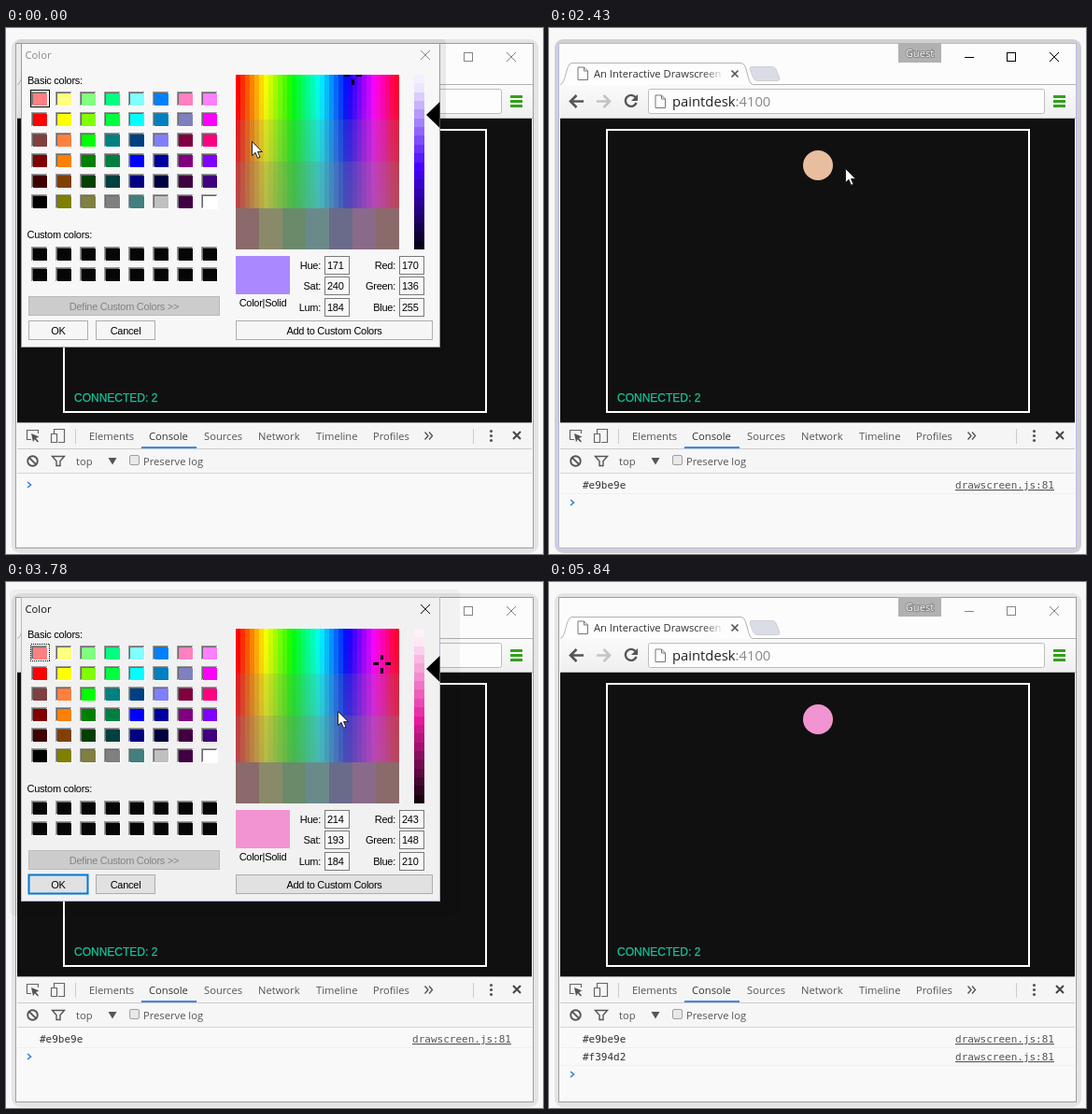
Recreate the animation shown at these times as an HTML page. Size 575 by 563 pixels, loop 5.87 s.

```html
<!DOCTYPE html>
<html lang="en">
<head>
<meta charset="utf-8">
<title>Color picker demo</title>
<style>
html, body { margin: 0; width: 100%; height: 100%; overflow: hidden; background: #f8f8f8; }
svg { display: block; width: 575px; height: 563px; }
text { white-space: pre; }
.ui { font: 11.2px "Open Sans", sans-serif; fill: #555; }
.dlg { font: 11px "Liberation Sans", Arial, sans-serif; letter-spacing: -.27px; fill: #000; }
.mono { font: 11px "DejaVu Sans Mono", monospace; fill: #303030; }
.status { font: 12px "Liberation Sans", Arial, sans-serif; fill: #18c49c; stroke: #18c49c; stroke-width: .25px; }
.mid { text-anchor: middle; }
.end { text-anchor: end; }
.crisp { shape-rendering: crispEdges; }
</style>
</head>
<body>
<svg id="stage" viewBox="0 0 575 563"></svg>
<script>
const LOOP = 5870;
const stage = document.getElementById('stage');

const rect = (x, y, w, h, fill, more = '') =>
  `<rect x="${x}" y="${y}" width="${w}" height="${h}" fill="${fill}" ${more}/>`;
const text = (x, y, s, cls, more = '') => `<text x="${x}" y="${y}" class="${cls}" ${more}>${s}</text>`;
const path = (d, stroke, width = 1, fill = 'none', more = '') =>
  `<path d="${d}" stroke="${stroke}" stroke-width="${width}" fill="${fill}" ${more}/>`;
const times = (n, make) => Array.from({ length: n }, (_, i) => make(i)).join('');

function browserWindow() {
  const pageIcon = (x, y) =>
    path(`M${x} ${y}h6.5l4 4v9.500h-10.500zM${x + 6.5} ${y}v4h4`, '#777', 1, '#fff');
  return `
  <rect id="glow" x="6" y="12" width="564" height="550" rx="9"/>
  <rect id="frame" x="10.500" y="16.500" width="554" height="540" fill="#fcfcfc"/>
  ${rect(12, 61, 552, 36, 'url(#bar)')}
  ${rect(12, 96, 552, 1, '#b6b6b6')}
  ${path('M12 60.500C18 60 18 38.500 24 37.500H206C213 38 212 60 218 60.500H564', '#b2b2b2', 1, '#fdfdfd')}
  ${path('M216 41.500H239Q242 41.500 243 44L247 54Q247 56.500 244 56.500H224Q220 56.500 219 54L215 44Z', '#cdd0d8', 1, '#dadde5')}
  ${pageIcon(31, 42)}
  ${text(48, 53, 'An Interactive Drawscreen', 'ui', 'clip-path="url(#tabclip)" style="fill:#333"')}
  ${rect(164, 40, 24, 18, 'url(#tabfade)')}
  ${path('M195.500 45.500l7 7m0-7l-7 7', '#555', 1.7)}
  ${rect(374, 16, 46, 21, '#b1b1b1')}
  ${text(397, 31, 'Guest', 'ui mid', 'style="fill:#fff;paint-order:stroke;stroke:#777;stroke-width:1.500px"')}
  <g id="controls" fill="none" class="crisp"><path d="M445 31.500h10M490.500 26.500h9v9h-9z"/>
    <path d="M536 26l10 10m0-10l-10 10" shape-rendering="auto"/></g>
  ${path('M37 78.500H23M29.500 72L23 78.500L29.500 85', '#555', 2.6)}
  ${path('M51 78.500H65M58.500 72L65 78.500L58.500 85', '#c4c4c4', 2.6)}
  ${path('M92.500 74A6 6 0 1 0 93.500 80', '#555', 2.400)}
  ${path('M95 71v7h-7z', 'none', 0, '#555')}
  ${rect(106.5, 65.5, 424, 26, '#fdfdfd', 'stroke="#bdbdbd" rx="2"')}
  ${pageIcon(114, 72)}
  <text x="132" y="84" style="font:14.800px 'Open Sans',sans-serif;fill:#222">paintdesk<tspan fill="#888">:4100</tspan></text>
  ${times(3, i => rect(540, 72 + 5 * i, 13, 3, '#34a01c', 'rx=".5"'))}
  ${rect(12, 97, 551, 325, '#101010')}
  ${rect(62, 109, 452, 302, 'none', 'stroke="#fff" stroke-width="2"')}
  <circle id="dot" cx="288" cy="147" r="16"/>
  ${text(73, 400, 'CONNECTED: 2', 'status')}`;
}

function devTools() {
  const tabs = [['Elements', 89], ['Console', 153], ['Sources', 212], ['Network', 270], ['Timeline', 332], ['Profiles', 393]];
  const logLine = (id, y, hex) => `<g id="${id}">${text(36, y, hex, 'mono')}
    ${text(541, y, 'drawscreen.js:81', 'mono end', 'style="fill:#555" text-decoration="underline"')}
    ${rect(12, y + 5, 551, 1, '#f0f0f0')}</g>`;
  return `
  ${rect(12, 422, 551, 28, '#f5f5f5')}
  ${rect(12, 422, 551, 1, '#a3a3a3')}
  ${rect(12, 450, 551, 26, '#f6f6f6')}
  ${rect(12, 450, 551, 1, '#ccc')}${rect(12, 476, 551, 1, '#d6d6d6')}
  ${rect(12, 477, 551, 79, '#f9f9f9')}
  ${path('M27 440.500H22.500V430.500H34.500V434', '#666', 1.2)}
  ${path('M27 434l8.500 3.500-3.500 1.500 3 3.500-1.200 1-3-3.300-1.800 3z', 'none', 0, '#555')}
  ${path('M51.500 434V429.500H62.500V443.500H56M48.500 434.500h6v9h-6z', '#666', 1.2)}
  ${rect(74, 429, 1, 16, '#ccc')}${rect(500, 429, 1, 16, '#ccc')}
  ${tabs.map(([s, x]) => text(x, 441, s, 'ui', s === 'Console' ? 'style="fill:#333"' : '')).join('')}
  ${rect(145, 448, 59, 2, '#4286e0')}
  ${path('M448.500 432.500l3.500 4-3.500 4M453 432.500l3.500 4-3.500 4', '#555', 1.4)}
  ${times(3, i => `<circle cx="519.500" cy="${431.5 + 5 * i}" r="1.600" fill="#555"/>`)}
  ${path('M543 432l8 8m0-8l-8 8', '#444', 2)}
  <circle cx="28.500" cy="463.500" r="5.300" fill="none" stroke="#555" stroke-width="1.900"/>
  ${path('M24.800 459.800l7.400 7.400', '#555', 1.9)}
  ${path('M49.500 458.500H62.500L58 463.500V468.500H54V463.500Z', '#555', 1.4)}
  ${text(75, 468, 'top', 'ui')}
  ${path('M109.500 460h9l-4.500 7.500z', 'none', 0, '#555')}
  ${rect(132.5, 457.500, 10, 10, '#e8e8e8', 'stroke="#a0a0a0" rx="1.500"')}
  ${text(147, 468, 'Preserve log', 'ui')}
  ${logLine('log1', 493, '#e9be9e')}${logLine('log2', 512, '#f394d2')}
  <path id="prompt" d="M23 -3l3.500 3-3.500 3" fill="none" stroke="#3a7fe0" stroke-width="1.600"/>`;
}

const BASIC = [
  'ff8080 ffff80 80ff80 00ff80 80ffff 0080ff ff80c0 ff80ff',
  'ff0000 ffff00 80ff00 00ff40 00ffff 0080c0 8080c0 ff00ff',
  '804040 ff8040 00ff00 008080 004080 8080ff 800040 ff0080',
  '800000 ff8000 008000 008040 0000ff 0000a0 800080 8000ff',
  '400000 804000 004000 004040 000080 000040 400040 400080',
  '000000 808000 808040 808080 408080 c0c0c0 400040 ffffff'
].map(row => row.split(' '));

function swatch(col, y, color) {
  const x = 27 + 26 * col;
  return rect(x, y, 18, 16, '#fff') + rect(x, y, 17, 15, '#9a9a9a') +
    rect(x + 1, y + 1, 16, 14, '#e3e3e3') + rect(x + 1, y + 1, 15, 13, '#696969') +
    rect(x + 2, y + 2, 15, 13, color);
}

function picker() {
  return `<g class="crisp">
  ${times(35, i => rect(246 + 5 * i, 50, 5, 187, `hsl(${i * 360 / 35},100%,50%)`))}
  ${rect(246, 50, 175, 187, 'url(#grey)')}
  ${times(7, i => rect(246 + 25 * i, 193, 25, 44, `hsl(${i * 60},13%,48%)`))}
  ${times(20, i => `<rect class="lum" x="437" y="${50 + 9.35 * i}" width="11" height="9.500"/>`)}</g>
  <g clip-path="url(#spectrum)"><path id="cross" class="crisp" stroke="#000" stroke-width="3"
    d="M-9 .5h6M4 .5h6M.5 -9v5M.5 5v6"/></g>
  ${path('M450 93L464.500 79V107Z', 'none', 0, '#000')}`;
}

const FIELDS = ['Hue', 'Sat', 'Lum', 'Red', 'Green', 'Blue'];

function dialog() {
  const field = (name, i) => {
    const x = i < 3 ? 341 : 421, y = 244 + 22.5 * (i % 3) | 0;
    return text(x - 4, y + 14, name + ':', 'dlg end') +
      rect(x + .5, y + .5, 26, 19, '#f7f7f7', 'stroke="#7a7a7a"') +
      text(x + 3, y + 14, '', 'dlg value');
  };
  const button = (x, y, w, label, id) =>
    rect(x + .5, y + .5, w - 1, 20, '#e1e1e1', `stroke="#adadad" id="${id}"`) +
    text(x + w / 2, y + 15, label, 'dlg mid');
  return `<g id="dialog">
  <rect id="shade" fill="#000" rx="5"/>
  <rect id="panel" x="16.500" y="16.500" width="448" height="325"/>
  <text id="title" x="20.500" y="33" class="ui">Color</text>
  <path id="close" d="M444 24l10 10m0-10l-10 10" fill="none"/>
  ${text(23, 60, 'Basic colors:', 'dlg')}
  ${text(22.5, 225, 'Custom colors:', 'dlg')}
  <g class="crisp">
  ${BASIC.map((row, r) => row.map((c, i) => swatch(i, Math.round(68 + 21.9 * r), '#' + c)).join('')).join('')}
  ${times(16, i => swatch(i % 8, 234 + 22 * (i >> 3), '#060606'))}
  <rect id="focus" x="26.500" y="66.500" width="20" height="18" fill="none" stroke="#000"/>
  </g>
  ${picker()}
  ${rect(246, 244, 58, 41, '#fff', 'id="preview"')}
  ${text(275, 298, 'Color|Solid', 'dlg mid')}
  ${FIELDS.map(field).join('')}
  ${rect(24.5, 287.5, 204, 20, '#cccccc', 'stroke="#bababa"')}
  ${text(126.5, 302, 'Define Custom Colors &gt;&gt;', 'dlg mid', 'style="fill:#838383"')}
  ${button(24, 313, 64, 'OK', 'ok')}${button(96, 313, 64, 'Cancel', 'cancel')}
  ${button(246, 313, 211, 'Add to Custom Colors', 'add')}
  </g>`;
}

stage.innerHTML = `<defs>
  <linearGradient id="bar" x2="0" y2="1"><stop stop-color="#fafafa"/><stop offset="1" stop-color="#efefef"/></linearGradient>
  <linearGradient id="tabfade"><stop stop-color="#fdfdfd" stop-opacity="0"/><stop offset="1" stop-color="#fdfdfd"/></linearGradient>
  <linearGradient id="grey" x2="0" y2="1">${
    [[0, 0], [.257, .1], [.257, .24], [.497, .34], [.497, .48], [.765, .56]]
      .map(([o, a]) => `<stop offset="${o}" stop-color="#808080" stop-opacity="${a}"/>`).join('')}</linearGradient>
  <clipPath id="tabclip"><rect x="46" y="40" width="141" height="18"/></clipPath>
  <clipPath id="spectrum"><rect x="246" y="50" width="175" height="187"/></clipPath>
  </defs>` + rect(0, 0, 575, 563, '#f8f8f8') + browserWindow() + devTools() + dialog() +
  path('M.5 .5V15.500L4 12.300L6.500 18.300L9 17.300L6.500 11.500H11.300Z', '#222', 1, '#fff', 'id="cursor"');

const el = id => document.getElementById(id);
const set = (id, attrs) => {
  for (const name in attrs) el(id).setAttribute(name, attrs[name]);
};

// start, colour, crosshair x and y, field values
const PICKS = [
  [0, '#aa88ff', 371, 50, [171, 240, 184, 170, 136, 255]],
  [850, '#e9be9e', 259, 121, [17, 149, 184, 233, 190, 158]],
  [2740, '#e9be9e', 258, 119, [17, 151, 184, 233, 190, 158]],
  [3480, '#f394d2', 402, 87, [214, 193, 184, 243, 148, 210]]
];

// time, x, y of the pointer tip
const POINTER = [
  [0, 263, 121], [30, 263, 121], [210, 259, 121], [1000, 259, 121], [1450, 57, 323],
  [1880, 57, 323], [2020, 86, 300], [2130, 86, 300], [2430, 317, 150], [2520, 317, 148],
  [2700, 313, 165], [2980, 313, 165], [3300, 402, 88], [3660, 402, 88], [3780, 355, 138],
  [3900, 96, 320], [4000, 47, 324], [4640, 47, 324], [4830, 61, 421], [5080, 61, 421], [5420, 560, 570]
];

const clamp = v => Math.max(0, Math.min(1, v));
const smooth = p => p * p * (3 - 2 * p);
const easeOut = p => 1 - (1 - p) ** 2;
const progress = (t, start, length) => easeOut(clamp((t - start) / length));

function pointerAt(t) {
  const next = POINTER.findIndex(k => k[0] > t);
  if (next < 0) return POINTER.at(-1).slice(1);
  const [t0, x0, y0] = POINTER[next - 1], [t1, x1, y1] = POINTER[next];
  const p = smooth((t - t0) / (t1 - t0));
  return [x0 + (x1 - x0) * p, y0 + (y1 - y0) * p];
}

function dialogOpacity(t) {
  if (t < 2100) return 1 - progress(t, 1830, 180);
  return progress(t, 2745, 190) - progress(t, 4505, 180);
}

let shownPick;
function showPick(pick) {
  if (pick === shownPick) return;
  shownPick = pick;
  const [, color, x, y, values] = pick;
  const [hue, sat] = values;
  set('preview', { fill: color });
  set('cross', { transform: `translate(${x} ${y})` });
  document.querySelectorAll('.value').forEach((node, i) => node.textContent = values[i]);
  document.querySelectorAll('.lum').forEach((node, i) =>
    node.setAttribute('fill', `hsl(${hue * 1.5},${sat / 2.4}%,${i ? 100 - 5 * i : 97}%)`));
}

function showWindow(active) {
  set('glow', { fill: active ? '#d0d0d2' : '#e4e4e4' });
  set('frame', { stroke: active ? '#b4b9ee' : '#9e9e9e' });
  set('controls', { stroke: active ? '#000' : '#858585' });
}

function showDialog(t, x, y) {
  const opacity = dialogOpacity(t), focused = t >= 840;
  const scale = .957 + .043 * opacity;
  const hover = x >= 24 && x < 88 && y >= 313 && y < 334;
  set('dialog', {
    opacity, visibility: opacity > 0 ? 'visible' : 'hidden',
    transform: `translate(240 177.5) scale(${scale}) translate(-240 -177.5)`
  });
  set('shade', focused ? { x: 4, y: 8, width: 482, height: 349, opacity: .04 }
    : { x: 11, y: 12, width: 460, height: 335, opacity: .07 });
  set('panel', { fill: focused ? '#f1f1f1' : '#f7f7f7', stroke: focused ? '#b0b6e6' : '#999' });
  set('title', { style: `fill:${focused ? '#111' : '#8a8a8a'}` });
  set('close', { stroke: focused ? '#111' : '#8a8a8a' });
  set('focus', { 'stroke-dasharray': t > 2740 ? '1 1' : 'none' });
  for (const id of ['ok', 'cancel', 'add']) {
    set(id, { fill: focused ? '#e1e1e1' : '#f6f6f6', stroke: '#adadad', 'stroke-width': 1 });
  }
  if (focused) {
    set('ok', hover ? { fill: '#cce4f7', stroke: '#20659c' } : { stroke: '#0078d7', 'stroke-width': 2 });
  }
}

function draw(now) {
  const t = now % LOOP;
  const [x, y] = pointerAt(t);
  const lines = (t >= 1860) + (t >= 4540);
  showPick(PICKS.findLast(p => t >= p[0]));
  showWindow((t >= 1860 && t < 2740) || (t >= 4540 && t < 5840));
  showDialog(t, x, y);
  set('dot', { fill: ['#aa88ff', '#e9be9e', '#f394d2'][lines] });
  set('log1', { visibility: lines > 0 ? 'visible' : 'hidden' });
  set('log2', { visibility: lines > 1 ? 'visible' : 'hidden' });
  set('prompt', { transform: `translate(0 ${489 + 19 * lines})` });
  set('cursor', { transform: `translate(${Math.round(x)} ${Math.round(y)})` });
}

const began = performance.now();
function tick() {
  draw(performance.now() - began);
  requestAnimationFrame(tick);
}
tick();
</script>
</body>
</html>
```
